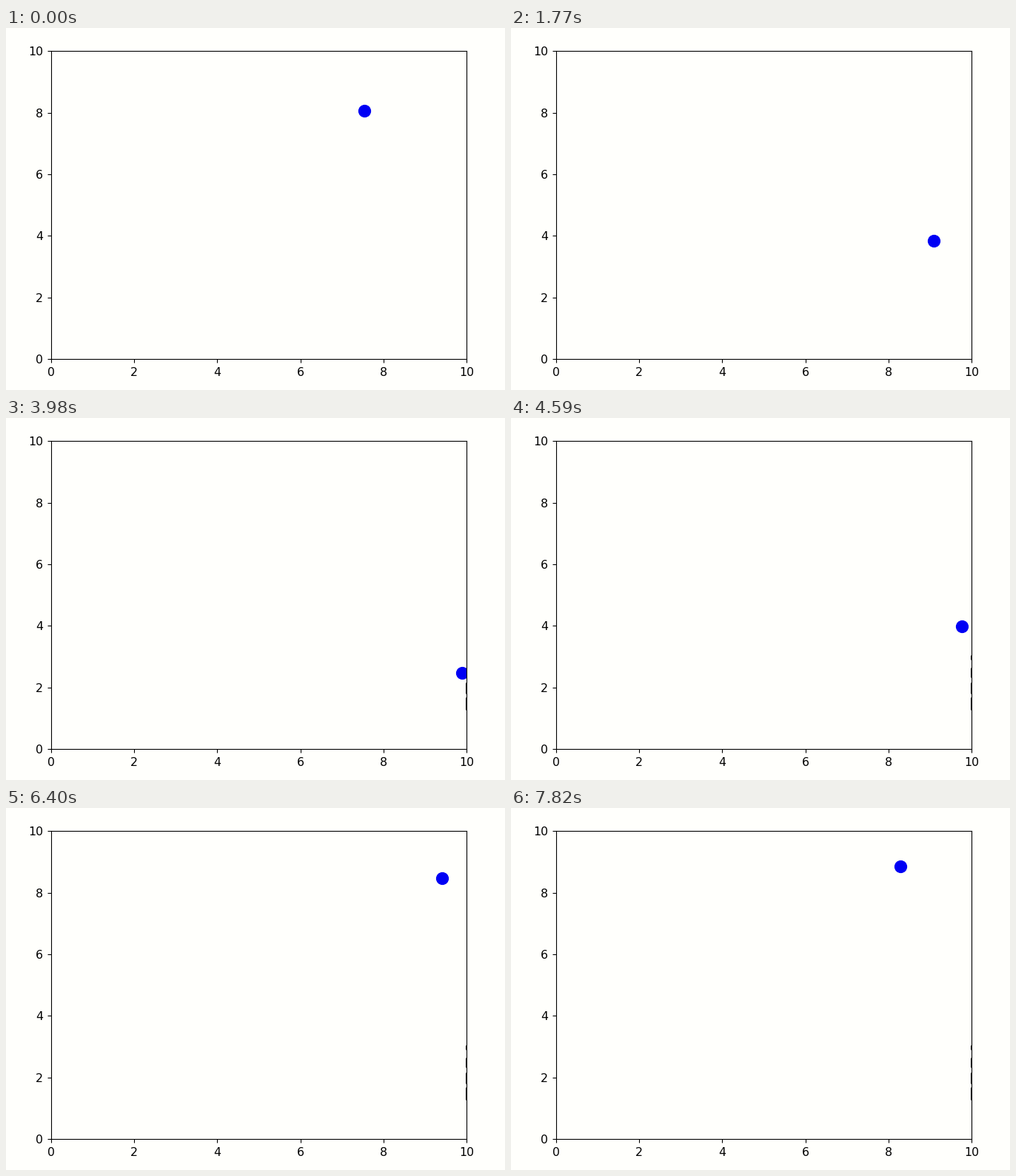
A matplotlib script for the animation above (8 s loop, 674x490 px).

```python
import numpy as np
import matplotlib.pyplot as plt
from matplotlib.animation import FuncAnimation

W, H, DPI = 674, 490, 100
LEFT, RIGHT, TOP, BOTTOM = 61, 622, 31.2, 448.2   # axes edges in pixels
LOOP, INTERVAL = 8000, 25
FIRST_STEP, STEP = 145, 201.5                     # ms
ZOOM = 1.13                                       # scale of default sizes

# The ball moves half a unit per step and waits where it turns at a wall.
TURN_STEPS = [0, 14, 18, 35, 36, 39]
TURN_X = [7.54, 9.965, 9.965, 9.293, 9.293, 8.289]
TURN_Y = [8.058, 1.487, 1.487, 9.96, 9.96, 8.849]

plt.rcParams.update({
    "font.family": "DejaVu Sans",
    "font.size": 10 * ZOOM,
    "axes.linewidth": 0.8,
})

BACK = "#fffffc"
fig = plt.figure(figsize=(W / DPI, H / DPI), dpi=DPI, facecolor=BACK)
ax = fig.add_axes([LEFT / W, 1 - BOTTOM / H,
                   (RIGHT - LEFT) / W, (BOTTOM - TOP) / H], facecolor=BACK)
ax.set(xlim=(0, 10), ylim=(0, 10))
ax.tick_params(length=3.5 * ZOOM, pad=3.5 * ZOOM, width=0.8)

ball, = ax.plot([], [], "o", color="#0000f4", ms=10 * ZOOM, mew=ZOOM)
marks = ax.vlines([], [], [], color="black", lw=72 / DPI)


def position(step):
    return (np.interp(step, TURN_STEPS, TURN_X),
            np.interp(step, TURN_STEPS, TURN_Y))


def wall_mark(step):
    """Dark trace left on the right wall by the ball at a given step."""
    px_x, px_y = (RIGHT - LEFT) / 10, (BOTTOM - TOP) / 10
    x, y = position(step)
    gap = (10 - x) * px_x - 0.5
    half = np.sqrt(max(8.6 ** 2 - gap ** 2, 0)) / px_y
    wall = 10 - 1 / px_x
    return [(wall, y - half), (wall, y + half)]


def update(i):
    t = (i + 1) * INTERVAL
    step = max(0, int((t - FIRST_STEP) // STEP) + 1)
    x, y = position(step)
    ball.set_data([x], [y])
    marks.set_segments([wall_mark(s) for s in range(18, 22) if s < step])
    return ball, marks


anim = FuncAnimation(fig, update, frames=LOOP // INTERVAL, interval=INTERVAL,
                     repeat=True, repeat_delay=0)
plt.show()
```
